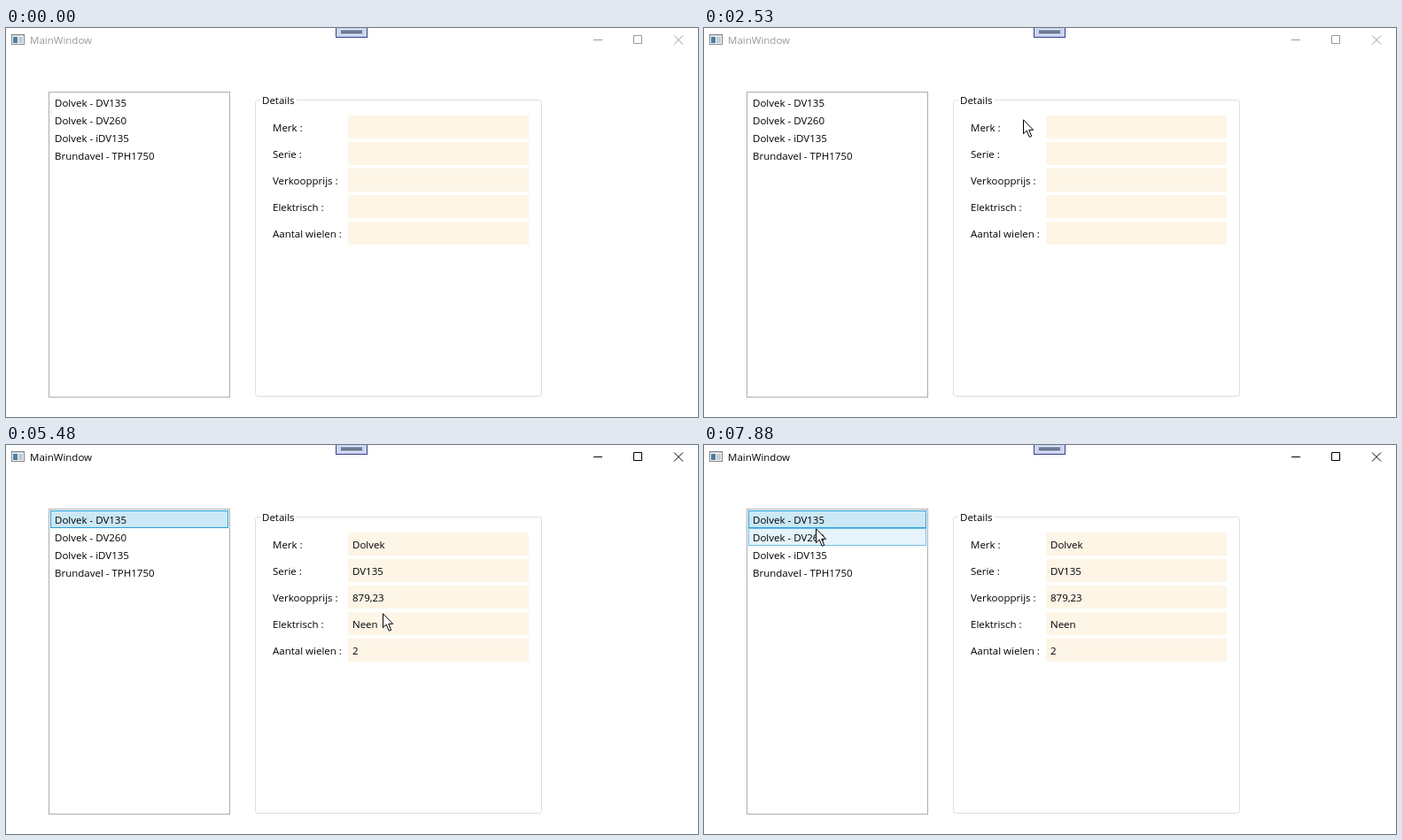
An HTML page that plays this animation: 781 px wide and 440 px high, repeating every 8 s.

```html
<!DOCTYPE html>
<html lang="nl">
<head>
<meta charset="utf-8">
<title>MainWindow</title>
<style>
  html, body { margin: 0; width: 100%; height: 100%; overflow: hidden; background: #fff; }
  svg { display: block; width: 781px; height: 440px; }
  text { font: 11.5px "Open Sans", "Noto Sans", sans-serif; white-space: pre; }
  .chrome { --ink: #999; }
  .chrome.active { --ink: #000; }
  .chrome text { fill: var(--ink); }
  .chrome path { stroke: var(--ink); fill: none; }
  .row { fill: none; stroke: none; }
  .row.hover { fill: #e5f3fb; stroke: #70c0e7; }
  .row.selected { fill: #cbe8f6; stroke: #26a0da; }
</style>
</head>
<body>
<svg viewBox="0 0 781 440">
  <g id="icon">
    <rect x="6.5" y="7.5" width="14" height="11" fill="#f4f5f6" stroke="#85898e"/>
    <path d="M7 8.5H20" stroke="#c9cdd2"/>
    <rect x="8" y="10" width="5" height="7" fill="#4c7f9f"/>
    <rect x="14" y="10" width="5" height="7" fill="#c6cbd1"/>
  </g>
  <g id="chrome" class="chrome">
    <text x="27" y="18">MainWindow</text>
    <path d="M663 13.5H673M708.5 8.5H717.5V17.5H708.5Z"/>
    <path d="M754 8.5L764 18.5M764 8.5L754 18.5"/>
  </g>
  <rect x="372.5" y="-1.5" width="35" height="12" fill="#ccd5f0" stroke="#39418f"/>
  <path d="M378 3.5H402M378 5.5H402" stroke="#1b293e"/>

  <rect x="48.5" y="72.5" width="204" height="345" fill="#fff" stroke="#abadb3"/>
  <g id="list"></g>

  <rect x="281.5" y="81.5" width="323" height="335" rx="3" fill="none" stroke="#d5dfe5"/>
  <rect x="287" y="80" width="41" height="3" fill="#fff"/>
  <text x="289" y="86">Details</text>
  <g id="fields"></g>
  <g id="values"></g>

  <path id="cursor" d="M.5 .8V16.6L4.2 13.1L7.3 20.3L9.7 19.3L6.7 12.3H11.6Z" fill="#fff" stroke="#000"/>
</svg>
<script>
const $ = id => document.getElementById(id);
const LOOP = 8000, ENTER = 820, CLICK = 3690, STEP = 78;

const bikes = ["Dolvek - DV135", "Dolvek - DV260", "Dolvek - iDV135", "Brundavel - TPH1750"];
const details = {
  "Merk :": "Dolvek",
  "Serie :": "DV135",
  "Verkoopprijs :": "879,23",
  "Elektrisch :": "Neen",
  "Aantal wielen :": "2"
};

const label = (x, y, s) => `<text x="${x}" y="${y}">${s}</text>`;
const fill = (id, items, draw) => $(id).innerHTML = items.map(draw).join("");

fill("list", bikes, (name, i) =>
  `<rect class="row" x="50.5" y="${74.5 + 20 * i}" width="200" height="19"/>` +
  label(55, 89 + 20 * i, name));
fill("fields", Object.keys(details), (name, i) =>
  `<rect x="386" y="${99 + 30 * i}" width="204" height="26" fill="#fdf5e6"/>` +
  label(301, 117 + 30 * i, name));
fill("values", Object.values(details), (value, i) => label(391, 117 + 30 * i, value));
const rows = document.querySelectorAll(".row");

// Pointer stops: arrival time, x, y
const stops = [
  [ENTER, 248, 388],
  // browse the list
  [1285, 92, 133], [1600, 95, 82], [1750, 89, 111], [1900, 100, 130],
  // point at the empty fields, then return to click
  [2440, 360, 102], [2830, 383, 197], [3310, 124, 82], [3540, 118, 82], [4465, 118, 82],
  // run down the filled fields
  [4560, 434, 82], [5540, 425, 195], [6100, 429, 230], [6430, 433, 224],
  // point at the price, back to the list
  [7050, 391, 172], [7240, 422, 176], [7640, 400, 176], [7830, 126, 94]
];

const ease = k => k * k * (3 - 2 * k);

function pointerAt(t) {
  const next = stops.findIndex(s => s[0] > t);
  if (next < 0) return stops.at(-1).slice(1);
  const [t0, x0, y0] = stops[next - 1], [t1, x1, y1] = stops[next];
  const k = ease((t - t0) / (t1 - t0));
  return [Math.round(x0 + (x1 - x0) * k), Math.round(y0 + (y1 - y0) * k)];
}

function draw(t) {
  const shown = t >= ENTER, active = t >= CLICK;
  let hovered = -1;
  $("cursor").style.display = shown ? "" : "none";
  if (shown) {
    // The pointer moves at the recorder's coarse frame rate
    const [x, y] = pointerAt(ENTER + STEP * Math.floor((t - ENTER) / STEP));
    $("cursor").setAttribute("transform", `translate(${x} ${y})`);
    if (x >= 49 && x < 252) hovered = Math.floor((y - 73) / 20);
  }
  rows.forEach((row, i) => {
    row.classList.toggle("hover", i === hovered);
    row.classList.toggle("selected", active && i === 0);
  });
  $("chrome").classList.toggle("active", active);
  $("values").style.display = active ? "" : "none";
}

const begin = performance.now();
function tick() {
  draw((performance.now() - begin) % LOOP);
  requestAnimationFrame(tick);
}
tick();
</script>
</body>
</html>
```
